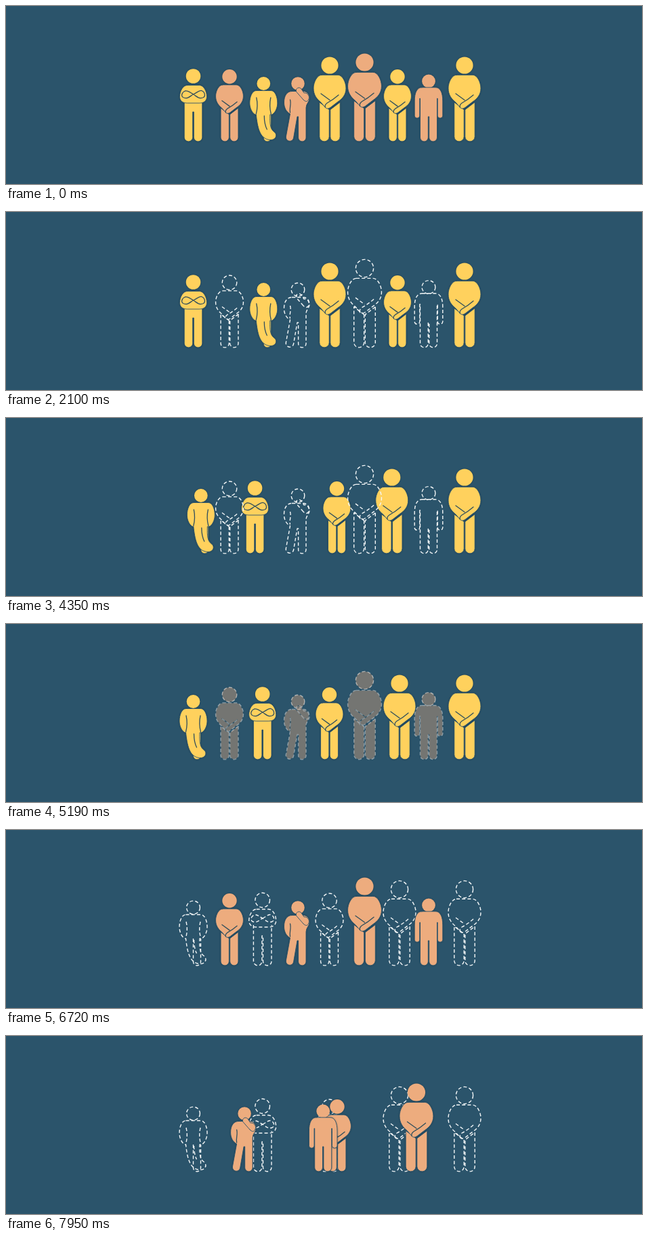
Recreate the animation shown at these times as an HTML page. Size 939 by 264 pixels, loop 8000 ms.

```html
<!DOCTYPE html>
<html lang="en">
<head>
<meta charset="utf-8">
<title>People in a row</title>
<style>
  html, body { margin: 0; width: 100%; height: 100%; overflow: hidden; background: #2b546b; }
  svg { display: block; width: 939px; height: 264px; }
  path, circle { vector-effect: non-scaling-stroke; stroke-linecap: round; stroke-linejoin: round; }
  .solid { filter: drop-shadow(0 0.5px 1px rgba(10, 30, 45, .45)); }
  .solid path { stroke: #2b546b; stroke-width: .9; }
  .solid .seam { fill: none; stroke: #314f5c; stroke-width: 1.3; }
  .outline * { fill: none; stroke: #f4f7f8; stroke-width: 1.4; stroke-dasharray: 5 3.2; stroke-linecap: butt; }
</style>
</head>
<body>
<svg id="stage" viewBox="0 0 939 264"></svg>
<script>
const LOOP = 8000, GROUND = 201;
const YELLOW = '#ffd15d', ORANGE = '#edac7e';

const head = (y, r) => `<circle cy="${y}" r="${r}"/>`;
const part = d => `<path d="${d}"/>`;
const seam = d => `<path class="seam" d="${d}"/>`;

// Each pose stands on y = 0 and is centred on x = 0.
const poses = {
  waiting:
    head(-113, 12.6) +
    part('M-.8-47V-7.3a7.2 7.2 0 0 1-14.4 0V-58Z') +
    part('M15.2-58V-7.3a7.2 7.2 0 0 1-14.4 0V-47Z') +
    part('M-12-98.7H12C18.5-98.7 24-88 24-79C24-69 18-63 12-59L1-50.5Q-4-47-7-51L-13-58C-19-63-24-69-24-79C-24-88-18.5-98.7-12-98.7Z') +
    seam('M-13-71L0-61.5M13-69Q5-62-4-57Q-8-54-6.5-50.5'),

  folded:
    head(-97, 10.8) +
    part('M-13.3-60V-6.3a6.2 6.2 0 0 0 12.5 0V-44H.8V-6.3a6.2 6.2 0 0 0 12.5 0V-60') +
    part('M-9-83.5H9C15-83.5 20-75 20-66.5C20-60 15-57 9-57H-9C-15-57-20-60-20-66.5C-20-75-15-83.5-9-83.5Z') +
    seam('M0-70C5-72 8-76 12-75.5C17-74 19-67 14-65C8-63 5-67 0-70C-5-73-8-76-12-75C-17-73-19-67-14-65C-8-63-5-67 0-70Z'),

  crossed:
    head(-86, 9.9) +
    part('M0-40V-5.5a5.5 5.5 0 0 0 11 0V-40') +
    part('M-11-75.5H11C17-75.5 20.5-66 20.5-57C20.5-49 16-41 12-40H9.5C9-25 10-18 16-14C21-10 18-1.5 9-2.5C-6-4-9-22-11-40H-12C-16-41-20.5-49-20.5-57C-20.5-66-17-75.5-11-75.5Z') +
    seam('M-10.5-65C-8.5-56-9-49-11-41M10.5-65C8.5-56 9-49 11-41M1-38C1-31 2-24 5-18'),

  thinking:
    head(-86, 9.8) +
    part('M-9-74.5H8C14-74.5 17-69 17-64C17-59 12-56 12-50V-5.8a5.7 5.7 0 0 1-11.4 0V-37H-1L-6.5-5a5.7 5.7 0 0 1-11.2-2L-11.5-41C-17-44-20.5-50-20.5-58C-20.5-68-16-74.5-9-74.5Z') +
    part('M8-62L-2.5-74C-4-79 2-82 5-78L9-72C13-73 18-68 16-63C14-58 11-59 8-62Z') +
    seam('M-11.5-62C-9.5-55-13-49-11.5-43'),

  standing:
    head(-89.5, 9.9) +
    part('M-10-80.2H10C17-80.2 20.8-73 20.8-60V-38.5a3.8 3.8 0 0 1-7.6 0V-64H12.5V-6a5.9 5.9 0 0 1-11.8 0V-37H-.7V-6a5.9 5.9 0 0 1-11.8 0V-64H-13.2V-38.5a3.8 3.8 0 0 1-7.6 0V-60C-20.8-73-17-80.2-10-80.2Z')
};

// Listed from back to front.
const people = [
  { pose: 'folded',   color: YELLOW, from: 276.5, to: 378.7 },
  { pose: 'crossed',  color: YELLOW, from: 380.3, to: 276.5 },
  { pose: 'waiting',  color: YELLOW, from: 478,   to: 581 },
  { pose: 'waiting',  color: YELLOW, from: 578,   to: 477.5, scale: .852 },
  { pose: 'waiting',  color: YELLOW, from: 677,   to: 677 },
  { pose: 'thinking', color: ORANGE, from: 431,   to: 332.5 },
  { pose: 'waiting',  color: ORANGE, from: 330,   to: 528.5, scale: .852 },
  { pose: 'waiting',  color: ORANGE, from: 529.5, to: 625, scale: 1.04 },
  { pose: 'standing', color: ORANGE, from: 624,   to: 429.5 }
];

const timing = {
  [YELLOW]: { move: 3474, fades: [[5880, 6480, 1, 0]] },
  [ORANGE]: { move: 7148, fades: [[660, 1300, 1, 0], [4970, 5560, 0, 1]] }
};
const MOVE_TIME = 1332;

const progress = (t, start, end) => Math.min(1, Math.max(0, (t - start) / (end - start)));
const easeInOut = p => p < .5 ? 8 * p ** 4 : 1 - 8 * (1 - p) ** 4;

function solidity(t, fades) {
  let value = 1;
  for (const [start, end, a, b] of fades)
    if (t >= start) value = a + (b - a) * progress(t, start, end);
  return value;
}

const stage = document.getElementById('stage');
stage.innerHTML = people.map(({ pose, color }) =>
  `<g><g class="outline">${poses[pose]}</g><g class="solid" fill="${color}">${poses[pose]}</g></g>`
).join('');
people.forEach((person, i) => {
  person.node = stage.children[i];
  [person.outline, person.solid] = person.node.children;
});

function render(t) {
  for (const { node, outline, solid, color, from, to, scale = 1 } of people) {
    const { move, fades } = timing[color];
    const x = from + (to - from) * easeInOut(progress(t, move, move + MOVE_TIME));
    const fill = solidity(t, fades);
    node.setAttribute('transform', `translate(${x.toFixed(2)} ${GROUND}) scale(${scale})`);
    solid.style.opacity = fill;
    outline.style.opacity = 1 - fill;
  }
}

const begin = performance.now();
function tick() {
  render((performance.now() - begin) % LOOP);
  requestAnimationFrame(tick);
}
render(0);
requestAnimationFrame(tick);
</script>
</body>
</html>
```
